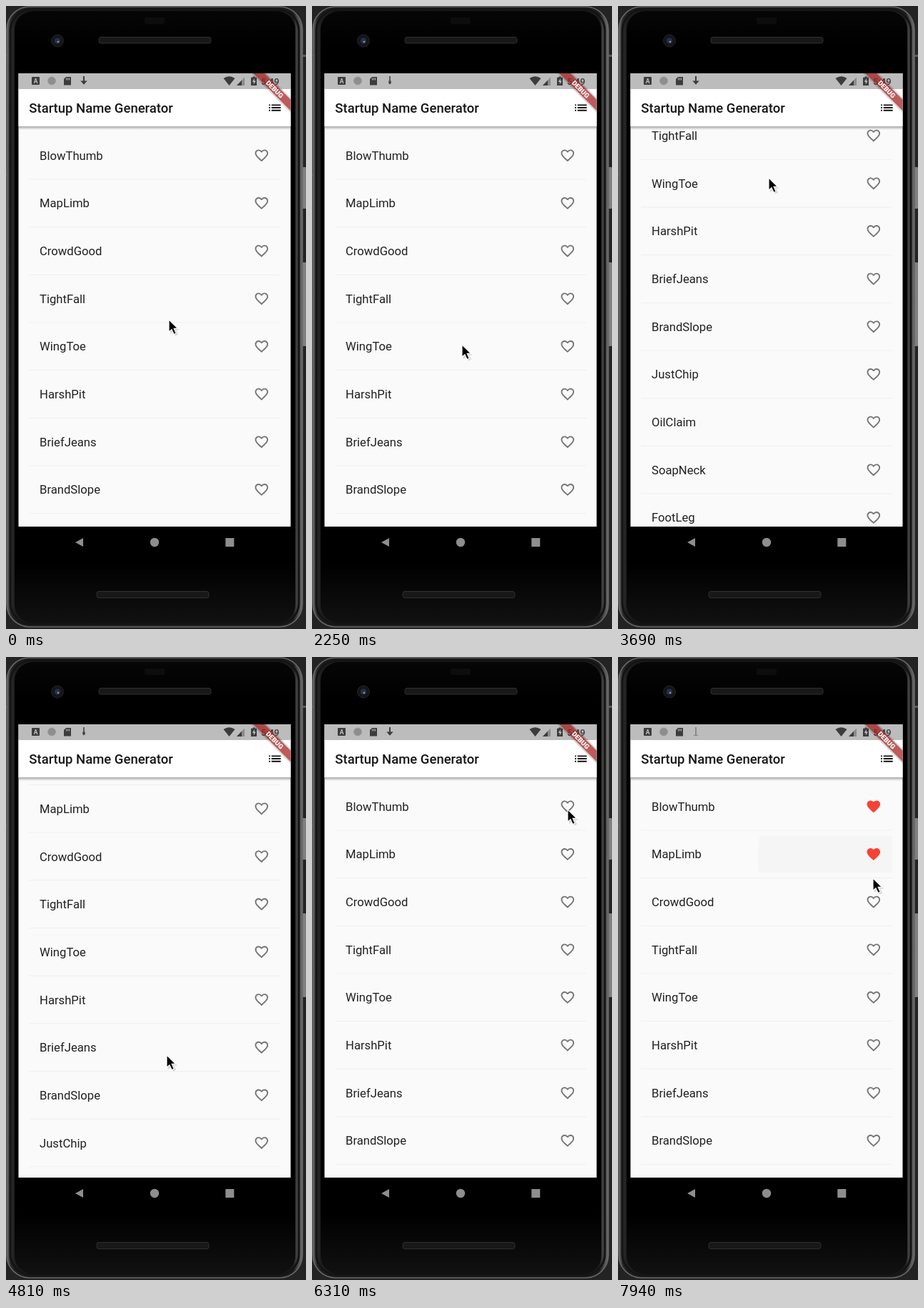
These frames come from a looping animation (420x870 px, 8 s). An HTML page:

```html
<!DOCTYPE html>
<html lang="en">
<head>
<meta charset="utf-8">
<title>Startup Name Generator</title>
<style>
  html, body { margin: 0; width: 100%; height: 100%; overflow: hidden; background: #232323; }
  svg { display: block; width: 420px; height: 870px; font-family: Roboto, sans-serif; }
</style>
</head>
<body>
<svg viewBox="0 0 420 870">
  <defs>
    <linearGradient id="edge">
      <stop offset="0" stop-color="#6c6c6c"/><stop offset=".014" stop-color="#2a2a2a"/>
      <stop offset=".03" stop-color="#1c1c1c"/><stop offset=".97" stop-color="#1c1c1c"/>
      <stop offset=".984" stop-color="#4a4a4a"/><stop offset="1" stop-color="#6c6c6c"/>
    </linearGradient>
    <linearGradient id="face" x2="0" y2="1">
      <stop offset="0" stop-color="#060606"/><stop offset=".06" stop-color="#000"/>
      <stop offset=".9" stop-color="#000"/><stop offset="1" stop-color="#111"/>
    </linearGradient>
    <linearGradient id="shade" x2="0" y2="1">
      <stop offset="0" stop-color="#444" stop-opacity=".45"/>
      <stop offset="1" stop-color="#444" stop-opacity="0"/>
    </linearGradient>
    <clipPath id="screen"><rect x="17.5" y="94" width="381" height="633"/></clipPath>
    <clipPath id="body"><rect x="17.5" y="168" width="381" height="559"/></clipPath>
    <clipPath id="tile"><rect x="32.3" y="-25.9" width="351.4" height="51.8"/></clipPath>
    <path id="solid" d="M12 21.35l-1.45-1.32C5.4 15.36 2 12.28 2 8.5 2 5.42 4.42 3 7.5 3c1.74 0 3.41.81 4.5 2.09C13.09 3.81 14.76 3 16.5 3 19.58 3 22 5.42 22 8.5c0 3.78-3.4 6.86-8.55 11.54z"/>
    <path id="hollow" d="M16.5 3c-1.74 0-3.41.81-4.5 2.09C10.91 3.81 9.24 3 7.5 3 4.42 3 2 5.42 2 8.5c0 3.78 3.4 6.86 8.55 11.54L12 21.35l1.45-1.32C18.6 15.36 22 12.28 22 8.5 22 5.42 19.58 3 16.5 3zm-4.4 15.55l-.1.1-.1-.1C7.14 14.24 4 11.39 4 8.5 4 6.5 5.5 5 7.5 5c1.54 0 3.04.99 3.57 2.36h1.87C13.46 5.99 14.96 5 16.5 5c2 0 3.5 1.5 3.5 3.5 0 2.89-3.14 5.74-7.9 10.05z"/>
  </defs>

  <!-- handset -->
  <g fill="#808080">
    <rect x="414" y="225" width="6" height="58" rx="1"/><rect x="414" y="358" width="6" height="117" rx="1"/>
    <path d="M0 68h3v3H0zM0 234h3v3H0zM415 68h5v3h-5z" opacity=".6"/>
  </g>
  <rect x="1" y="1" width="414" height="866" rx="32" fill="url(#edge)" stroke="#686868" stroke-width="1.5"/>
  <rect x="6" y="5" width="404" height="858" rx="29" fill="none" stroke="#141414" stroke-width="3"/>
  <rect x="12" y="7" width="393" height="855" rx="26" fill="url(#face)"/>
  <rect x="194" y="16" width="28" height="9" rx="2" fill="#0d0d0d"/>
  <g fill="#181818" stroke="#303030">
    <rect x="130" y="43.5" width="157" height="8.5" rx="3"/>
    <rect x="127" y="817.5" width="157" height="9" rx="3"/>
  </g>
  <circle cx="72" cy="48.5" r="8.5" fill="#151518" stroke="#242428"/>
  <circle cx="72" cy="48.5" r="4" fill="#27304a"/><circle cx="73" cy="50" r="1.3" fill="#8f98a8"/>

  <!-- app -->
  <g clip-path="url(#screen)">
    <rect x="17" y="94" width="382" height="633" fill="#fafafa"/>
    <g clip-path="url(#body)">
      <g id="list"></g>
      <ellipse id="glow" cx="226" cy="168" rx="300" fill="#2196f3"/>
    </g>
    <rect x="17" y="168" width="382" height="5" fill="url(#shade)"/>
    <rect x="17" y="115" width="382" height="53" fill="#fff"/>
    <rect x="17" y="94" width="382" height="22" fill="#bcbcbc"/>
    <text x="32.3" y="149" font-size="18.5" font-weight="500" fill="#161616">Startup Name Generator</text>
    <path transform="translate(365.2 130.9) scale(.926)" fill="#111" d="M3 7h2v2H3zm0 4h2v2H3zm0 4h2v2H3zM7 7h14v2H7zm0 4h14v2H7zm0 4h14v2H7z"/>

    <g fill="#3c3c3c">
      <rect x="36" y="99" width="11" height="11" rx="1"/>
      <text x="41.5" y="107.7" font-size="8.5" font-weight="700" text-anchor="middle" fill="#c8c8c8">A</text>
      <circle cx="64" cy="104.5" r="5.5" fill="#8e8e8e" stroke="#9c9c9c"/>
      <path d="M84 99h7v11.5H81V102z"/>
      <path d="M84.5 100.5v3m2-3v3m2-3v3" stroke="#bcbcbc"/>
      <path d="M304.5 101Q312.5 95.500 320.5 101L312.5 111z"/>
      <path d="M334 99.500V111H323z" fill="#8c8c8c"/><path d="M330 103.700V111h-7z"/>
      <path d="M345.500 98.500h3v1.200h2.500V111h-8V99.700h2.500z"/>
      <path d="M347.800 101l-3 5h2v3.500l3-5h-2z" fill="#bcbcbc"/>
      <text x="357" y="109.5" font-size="13" font-weight="500">5:49</text>
    </g>
    <g fill="#3c3c3c">
      <path id="stem" d="M108 98h2v11h-2z"/>
      <path id="tip" d="M107 104.500h4v3l-2 2-2-2z"/>
      <path id="head" d="M104.300 104.500h9.400l-4.700 5.200z"/>
      <path id="foot" d="M106 109h6v1h-6z"/>
    </g>

    <g transform="translate(398.5 94) rotate(45)">
      <rect x="-40" y="24" width="80" height="15" opacity=".15"/>
      <rect x="-37" y="25.9" width="74" height="11.1" fill="#b02020" opacity=".68"/>
      <text y="34.8" font-size="9.4" font-weight="900" text-anchor="middle" fill="#fff">DEBUG</text>
    </g>
  </g>

  <g fill="#8e8e8e">
    <path d="M97 749l11-6v12z"/><circle cx="208" cy="749" r="6.2"/><rect x="307.3" y="743" width="12" height="12"/>
  </g>

  <g id="cursor">
    <path d="M2 3v17l4-3.500 3 6 4-2-3-6h5z" opacity=".15"/>
    <path d="M0 0v17.200l3.900-3.600 3.200 7 3.100-1.400-3.100-6.800h5.400z" stroke="#fff" stroke-width="1.1"/>
  </g>
</svg>

<script>
const LOOP = 8000, PITCH = 66.67, FIRST = 208.7;
const names = ["BlowThumb", "MapLimb", "CrowdGood", "TightFall", "WingToe", "HarshPit", "BriefJeans",
  "BrandSlope", "JustChip", "OilClaim", "SoapNeck", "FootLeg", "CoalNest", "DryPlank"];
const taps = [6640, 7800];

// Steps: time, values..., easing towards the next step
const smooth = u => u * u * (3 - 2 * u);
const speedUp = u => u ** 1.5;
const slowDown = u => 1 - (1 - u) ** 2;

const pointer = [
  [0, 228, 438, smooth], [2000, 210, 473, smooth], [3150, 210, 473, speedUp], [3680, 211, 240, smooth],
  [4220, 211, 240, smooth], [4780, 225, 556, smooth], [5560, 225, 556, smooth], [6250, 358, 213, smooth],
  [6950, 358, 213, smooth], [7400, 357, 279, smooth], [7810, 357, 279, smooth], [7940, 357, 309, smooth]
];
const scroll = [
  [3160, 0, speedUp], [3690, 227, slowDown], [4150, 380, smooth], [4230, 380, smooth],
  [4810, 64, slowDown], [5080, 0, smooth]
];
const glow = [[5020, 0, slowDown], [5220, 1.25, smooth], [5440, 1, smooth], [5800, 0, smooth]];

const $ = id => document.getElementById(id);

function set(id, attrs) {
  for (const key in attrs) $(id).setAttribute(key, attrs[key]);
}

function track(steps, t) {
  const next = steps.findIndex(s => s[0] > t);
  if (next <= 0) return steps.at(next).slice(1, -1);
  const a = steps[next - 1], b = steps[next];
  const u = a.at(-1)((t - a[0]) / (b[0] - a[0]));
  return a.slice(1, -1).map((v, k) => v + (b[k + 1] - v) * u);
}

$("list").innerHTML = names.map((name, i) => `
  <g transform="translate(0 ${FIRST + i * PITCH})">
    ${i < taps.length ? `<g clip-path="url(#tile)"><circle id="ink${i}" cx="357" cy="4" fill="#c8c8c8"/></g>` : ""}
    <text x="47" y="6" font-size="16.67" fill="#212121">${name}</text>
    <use id="heart${i}" transform="translate(346.7 -11.1) scale(.926)"/>
    <path d="M32.3 33.3H383.7" stroke="#efefef"/>
  </g>`).join("");

function setHeart(i, liked) {
  set("heart" + i, { href: liked ? "#solid" : "#hollow", fill: liked ? "#f44336" : "#757575" });
}
names.forEach((_, i) => setHeart(i, false));

function drawDownload(t) {
  const p = t % 1250;
  const full = p < 240 || p >= 1130;
  const faint = !full && p < 780;
  set("head", { opacity: full ? 1 : 0 });
  set("tip", { opacity: full || faint ? 0 : .7 });
  set("foot", { opacity: faint ? .45 : 0 });
  set("stem", { opacity: full ? 1 : faint ? .4 : .75 });
}

function drawTap(i, age) {
  const active = age > -100 && age < 200;
  setHeart(i, age >= 0);
  set("ink" + i, {
    r: active ? 40 + age * (age < 0 ? .3 : .86) : 0,
    opacity: active ? .4 * (1 - Math.max(0, age) / 200) : 0
  });
}

function draw(t) {
  const [x, y] = track(pointer, t);
  const [offset] = track(scroll, t);
  const [strength] = track(glow, t);
  set("cursor", { transform: `translate(${x} ${y})` });
  set("list", { transform: `translate(0 ${-offset})` });
  set("glow", { ry: 38 * strength, opacity: .08 * strength });
  taps.forEach((tap, i) => drawTap(i, t - tap));
  drawDownload(t);
}

function frame() {
  draw(performance.now() % LOOP);
  requestAnimationFrame(frame);
}
frame();
</script>
</body>
</html>
```
